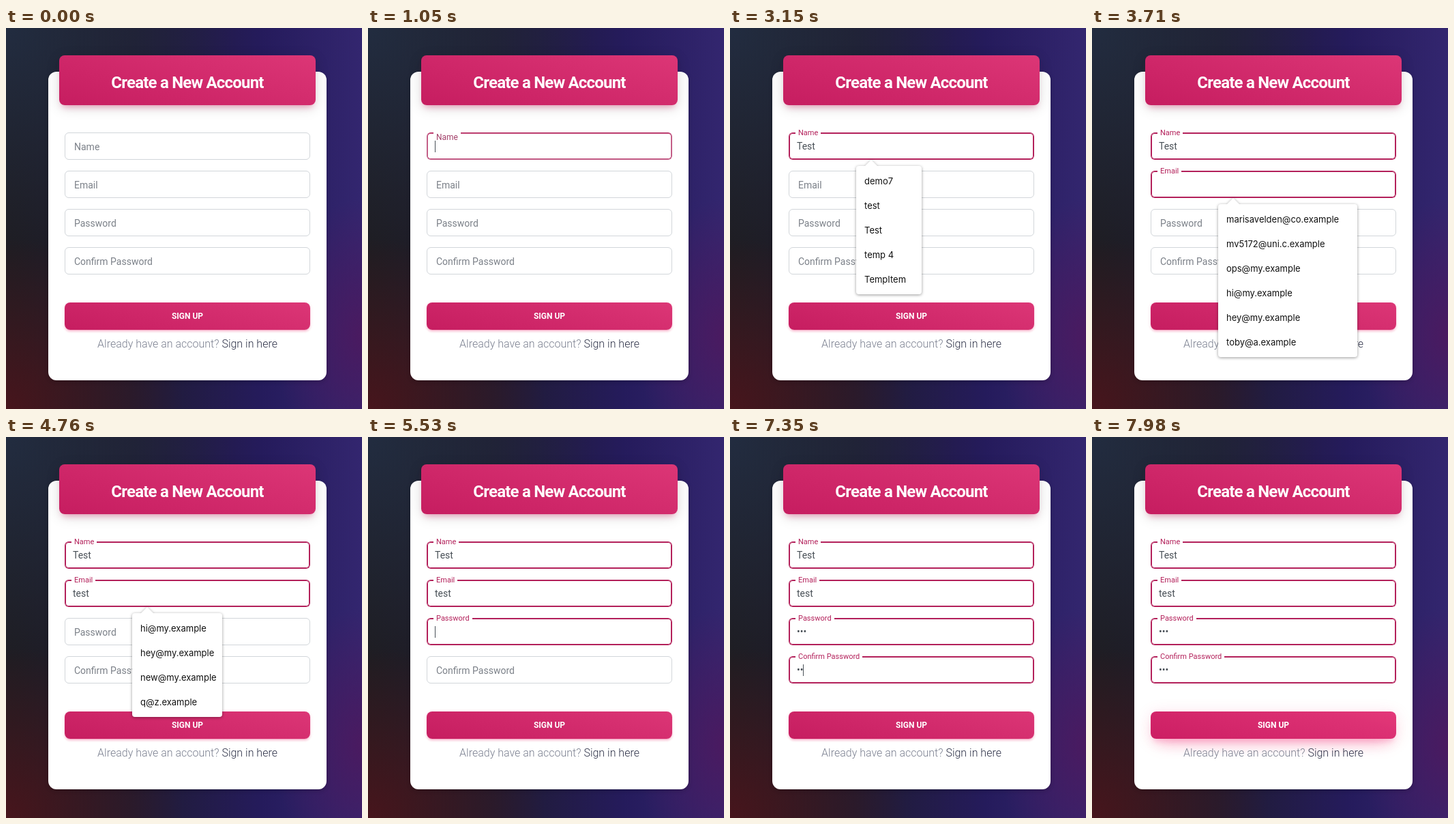
An HTML page that plays this animation: 522x558 px, repeating every 8 s.

```html
<!DOCTYPE html>
<html lang="en">
<head>
<meta charset="utf-8">
<title>Create a New Account</title>
<style>
  * { box-sizing: border-box; }
  html, body { margin: 0; width: 100%; height: 100%; overflow: hidden; }
  body { position: relative; font-family: Roboto, sans-serif; background:
    radial-gradient(ellipse 260px 250px at 0 100%, #47151c, #47151c00),
    radial-gradient(ellipse 130px 200px at 522px 450px, #4a1a60, #4a1a6000),
    radial-gradient(ellipse 330px 330px at 0 0, #222c40, #222c4000),
    linear-gradient(90deg, #1e1d22 0, #1f1c30 35%, #251b5c 72%, #33266f 100%); }
  body > div { position: absolute; }
  .card { left: 62px; top: 64px; width: 408px; height: 452px; border-radius: 12px; background: #fff;
    box-shadow: 0 2px 6px #0003; }
  .pink { background: linear-gradient(195deg, #dc3676, #c61d60); color: #fff; text-align: center; font-weight: 700; }
  .head { left: 78px; top: 40px; width: 376px; height: 73px; border-radius: 8px; font-size: 24px; line-height: 80px;
    letter-spacing: -.8px; box-shadow: 0 4px 20px #00000024, 0 7px 10px -5px #e91e6366; }
  .btn { left: 86px; top: 402px; width: 360px; height: 40px; border-radius: 8px; font-size: 12px; line-height: 40px; --h: 0;
    box-shadow:
      0 calc(3px + 11px * var(--h)) calc(3px + 23px * var(--h)) calc(-12px * var(--h)) rgb(233 30 99 / calc(.15 + .25 * var(--h))),
      0 calc(3px + 1px * var(--h)) calc(1px + 22px * var(--h)) calc(-2px + 2px * var(--h)) rgb(233 30 99 / calc(.2 - .05 * var(--h))),
      0 calc(1px + 7px * var(--h)) calc(5px + 5px * var(--h)) calc(-5px * var(--h)) rgb(233 30 99 / calc(.15 + .05 * var(--h))); }
  .foot { left: 62px; top: 452px; width: 408px; line-height: 22px; text-align: center; font-size: 16px; font-weight: 300;
    color: #7b8090; white-space: pre; }
  .foot b { font-weight: 300; color: #30344a; }

  .field { left: 86px; width: 360px; height: 40px; --p: 0; --red: #b3205a; }
  .box { position: absolute; inset: 0; border: 1px solid #d2d6da; border-radius: 6px; }
  .on .box { border-color: color-mix(in srgb, var(--red) calc(100% * var(--p)), #d2d6da); border-top-color: var(--red);
    box-shadow: inset 0 0 0 calc(1px * var(--p)) var(--red); }
  .label { position: absolute; left: 10px; top: calc(13px - 20px * var(--p)); padding: 0 4px; white-space: nowrap;
    font-size: calc(14px - 3px * var(--p)); line-height: 16px;
    color: color-mix(in srgb, var(--red) calc(100% * var(--p)), #7b8088); }
  .gap { position: absolute; left: 10px; top: 0; height: 2px; padding: 0 4px; overflow: hidden; white-space: nowrap;
    font-size: calc(14px - 3px * var(--p)); background: #fff; color: transparent; visibility: hidden; }
  .on .gap { visibility: visible; }
  .value { position: absolute; left: 12px; top: 12px; font-size: 14px; line-height: 16px; color: #495057; white-space: pre; }
  .value i { position: absolute; left: 100%; top: 0; width: 1px; height: 17px; background: #495057; }

  .menu { left: 185px; padding: 4px 12px; border-radius: 4px; background: #fff; color: #111; filter: drop-shadow(0 1px 2px #0006);
    font: 13px/36px Inter, sans-serif; white-space: nowrap; }
  .menu::before { content: ""; position: absolute; left: 12px; top: -9px; width: 20px; height: 10px; background: #fff;
    clip-path: polygon(50% 0, 100% 100%, 0 100%); }
</style>
</head>
<body>
<div class="card"></div>
<div class="pink head">Create a New Account</div>
<div class="pink btn">SIGN UP</div>
<div class="foot">Already have an account? <b>Sign in here</b></div>
<script>
const LOOP = 8000, BLINK = 490;

// focus/blur times, key press times, and extra caret restarts
const fields = [
  { name: "Name", text: "Test", focus: 980, blur: 3150, keys: [2310, 2450, 2590, 2800], restart: [1120] },
  { name: "Email", text: "test", focus: 3220, blur: 5110, keys: [3920, 4060, 4130, 4270] },
  { name: "Password", text: "•••", focus: 5110, blur: 6930, keys: [5950, 6160, 6510] },
  { name: "Confirm Password", text: "•••", focus: 6930, blur: LOOP, keys: [7210, 7280, 7420] }
];

const mails = ["hi@my.example", "hey@my.example", "new@my.example", "q@z.example"];
const menus = [
  { from: 1260, to: 2310, top: 202, width: 72, items: ["Marisa", "demo7", "d", "cd", "Toby", "test"] },
  { from: 2310, to: 3220, top: 202, width: 96, items: ["demo7", "test", "Test", "temp 4", "TempItem"] },
  { from: 3500, to: 3920, top: 258, width: 204,
    items: ["marisavelden@co.example", "mv5172@uni.c.example", "ops@my.example", ...mails.slice(0, 2), "toby@a.example"] },
  { from: 3920, to: 4060, top: 258, width: 132, items: [...mails, "ops@my.example"] },
  { from: 4060, to: 5110, top: 258, width: 132, items: mails }
];

const add = (tag, cls, parent, text = "") => {
  const el = document.createElement(tag);
  el.className = cls;
  el.textContent = text;
  return parent.appendChild(el);
};

fields.forEach((f, i) => {
  f.el = add("div", "field", document.body);
  f.el.style.top = 153 + 56 * i + "px";
  add("div", "box", f.el);
  add("div", "gap", f.el, f.name);
  add("div", "label", f.el, f.name);
  const value = add("div", "value", f.el);
  f.typed = add("span", "", value);
  f.caret = add("i", "", value);
});

menus.forEach(m => {
  m.el = add("div", "menu", document.body);
  m.el.style.top = m.top + "px";
  m.el.style.width = m.width + "px";
  m.items.forEach(text => add("div", "", m.el, text));
});

const btn = document.querySelector(".btn");
const clamp = x => Math.min(1, Math.max(0, x));

// CSS "ease": cubic-bezier(.25, .1, .25, 1)
function ease(x) {
  const curve = (a, b, u) => 3 * a * u * (1 - u) ** 2 + 3 * b * u * u * (1 - u) + u ** 3;
  let lo = 0, hi = 1;
  for (let i = 0; i < 16; i++) {
    const mid = (lo + hi) / 2;
    if (curve(.25, .25, mid) < x) lo = mid; else hi = mid;
  }
  return curve(.1, 1, lo);
}

function drawField(f, t) {
  const on = t >= f.focus;
  f.el.classList.toggle("on", on);
  f.el.style.setProperty("--p", on ? ease(clamp((t - f.focus + 10) / 200)) : 0);
  f.typed.textContent = f.text.slice(0, f.keys.filter(k => k <= t).length);
  const last = Math.max(...[f.focus, ...f.keys, ...(f.restart || [])].filter(k => k <= t));
  const lit = on && t < f.blur && (t - last) % (2 * BLINK) < BLINK;
  f.caret.style.visibility = lit ? "visible" : "hidden";
}

function draw(now) {
  const t = now % LOOP;
  fields.forEach(f => drawField(f, t));
  menus.forEach(m => m.el.style.display = t >= m.from && t < m.to ? "block" : "none");
  btn.style.setProperty("--h", t < 7630 ? 0 : ease(clamp((t - 7620) / 150)));
  btn.style.filter = `brightness(${1 + .03 * clamp((t - 7900) / 70)})`;
  requestAnimationFrame(draw);
}
draw(0);
</script>
</body>
</html>
```
